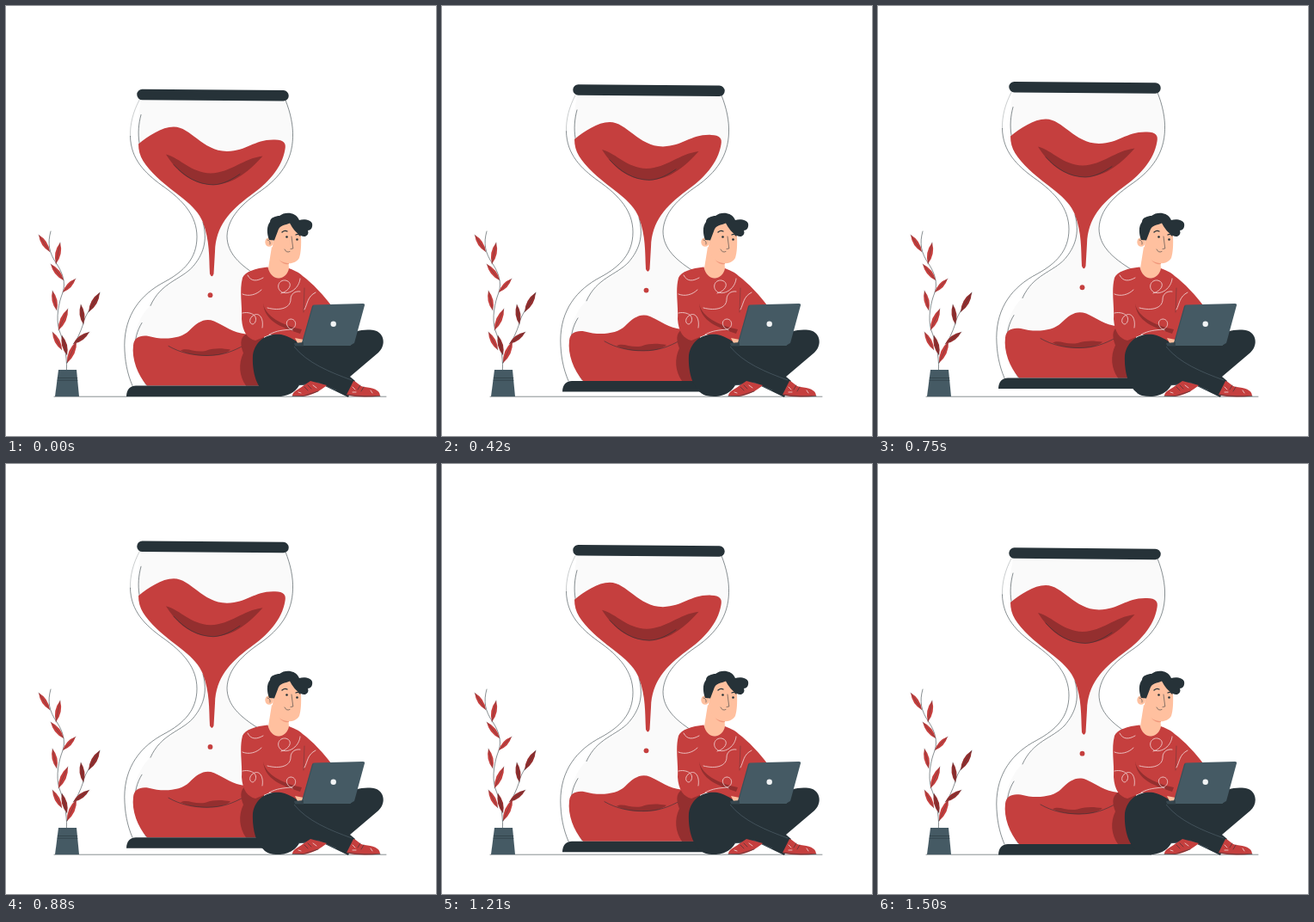
Write an HTML page that moves like this. It is 500 by 500 pixels and loops after 1540 ms.

```html
<!DOCTYPE html>
<html lang="en">
<head>
<meta charset="utf-8">
<title>Hourglass</title>
<style>
  html, body { margin: 0; height: 100%; overflow: hidden; background: #fff; }
  svg { display: block; width: 100vw; height: 100vh; }
  .dark { fill: #263238; }
  .red { fill: #c53f3e; }
  .deep { fill: #942f2f; }
  .slate { fill: #455a64; }
  .skin { fill: #ffc09f; }
  .line { fill: none; stroke: #263238; stroke-width: .55; stroke-linecap: round; stroke-linejoin: round; }
  .swirl { fill: none; stroke: #f3dcdc; stroke-width: .8; stroke-linecap: round; }
  .seam { fill: none; stroke: #55666f; stroke-width: .6; }
</style>
</head>
<body>
<svg viewBox="0 0 500 500">
  <path class="line" d="M56 454.200H442"/>

  <g id="plant">
    <path class="line" d="M70.500 423C71 405 67 390 61.500 376C58 362 61 346 66 333C70 321 65 309 59 300C50 287 48 276 52 262
      M71 415C73 400 83 391 90 369C92 360 96 355 109 334"/>
    <g id="leaves"></g>
    <path class="slate" d="M61 423H82L85 454H57Z"/>
    <path class="line" d="M60.300 432.500H82.900M60 435.200H83.100"/>
  </g>

  <g id="hourglass">
    <path fill="#fafafa" d="M157 110H325C331 125 334 140 333.500 153C333 181 318 200 297 215C275 230 258 246 257 268
      C257 288 272 302 295 316V442H163C152 428 147 412 148 396C150 375 156 360 168 349C183 318 231 318 231 270
      C231 238 205 227 182 205C162 187 153 171 153 149C153 135 155 121 157 110Z"/>
    <path class="line" stroke-opacity=".45" d="M155 110C148 123 144 138 144.500 152"/>
    <path class="line" d="M144.500 152C145 179 162 195 181 209C207 227 222 245 222 269C222 294 207 309 185 321
      C156 336 138 360 137.800 395C138 413 141 428 147 442
      M325 110C331 125 334 140 333.500 153C333 181 318 200 297 215C275 230 258 246 257 268C257 288 272 302 295 316
      M157 127C151 149 154 171 168 190M229 252C235 274 229 290 217 304C203 319 180 322 168 349
      M158 369C146 388 147 414 163 441"/>
    <path class="red" d="M154 161C165 152 181 141 195 141C215 141 228 169 257 169.500C281 169 289 155 313 156
      C323 156 326 160 324.500 167C321 189 304 207 284 221C260 239 244 256 243 286L241.500 312Q239.500 317.500 237 312
      C236 291 237 274 229 252C221 231 196 219 176 200C161 185 154 176 154 161Z"/>
    <path class="deep" d="M186 173C204 178 214 194 238 195C262 194 275 178 298.500 175C284 191 266 208 241 208.500C215 208 198 192 186 173Z"/>
    <path class="line" d="M195 185C208 199 222 208 241 208.500C253 208 263 202 272 196"/>
    <circle class="red" cx="237.500" cy="336.700" r="2.900"/>
    <path class="red" d="M148 395C149 386 156 383 166 384.500C182 389 203 388 213 378C223 368 231 363 242 367
      C255 373 263 380 279 382L298 390V442H164C153 429 146 411 148 395Z"/>
    <path class="deep" d="M203 401C211 397 219 404 232 401.500C244 397.500 252 399 261 400C257 405 243 407.500 232 407.200C221 407 211 405 203 401Z"/>
    <path class="line" d="M189 396C203 404 218 407 234 407C252 407 264 402 277 395"/>
    <path class="deep" d="M279 382C271 387 273 396 276 404C270 416 271 431 279 442H300V382Z"/>
    <path class="dark" d="M140 454.500C140 446 145 442 151 442H318V454.500Z"/>
    <path d="M158.500 103.600L322.500 104.900" stroke="#263238" stroke-width="12.500" stroke-linecap="round"/>
  </g>

  <g id="person">
    <path class="skin" d="M309 280L305 305C306 321 328 320 329 306L328 290Z"/>
    <path class="red" d="M304.500 303.500C290 305 278 309 275 316C271 331 275 348 274 364C275 379 281 387 290 389L307 382
      L345 392L359 348H378C370 337 356 322 345 314C340 309 334 307 329 305C326 320 308 321 304.500 303.500Z"/>
    <path class="deep" d="M299 346C302 361 320 371 344 376L342 381C318 373 301 366 299 346Z"/>
    <path class="line" stroke-opacity=".6" d="M347 328L346 356"/>
    <path class="swirl" d="M275 335C282 338 291 336 297 330M281 313C285 321 292 320 299 316
      M342 317C341 328 330 336 321 333C313 328 317 318 325 319C334 321 331 331 320 334
      M304 351C319 355 331 351 331 341C331 335 336 331 342 332
      M275 357C283 355 293 359 290 367C287 374 280 367 286 361C294 354 300 363 298 374
      M347 353C351 346 350 338 360 333M306 382C315 377 323 377 331 376C339 374 338 364 331 364C324 365 325 374 333 377"/>

    <path fill="#f0987c" d="M316 292C319 299 325 301 329 300V297Z"/>
    <path class="skin" d="M312 258L320 250H335L343 267C343.500 278 343 287 341 293C338 298 332 300 327 299C318 298 311 291 310 280Z"/>
    <ellipse class="skin" cx="306" cy="274.500" rx="4.700" ry="5.300"/>
    <path class="dark" d="M306 272C303 264 303 256 307 251C307 246 314 244 318 244C324 239 337 239 341 249
      C347 247 355 249 356 253C357 258 354 261 351 261C353 266 348 270 343 267C337 264 333 258 330 252.500
      C325 255 318 254 316 262L312 272.500Z"/>
    <g class="line">
      <path stroke-width="1.300" d="M321 263Q324 260.500 327 262M337 266Q340 264.500 342 267"/>
      <path d="M332 268L333.800 282L331 282.500M324 283Q326 287.500 330 285.500M304 272Q308 273 307 277"/>
    </g>
    <circle class="dark" cx="326.500" cy="268.500" r="1.300"/>
    <circle class="dark" cx="338.500" cy="271.500" r="1.300"/>

    <path class="dark" d="M287 406C290 387 306 380 320 382C330 384 338 390 346 395H400L406 379C415 376 424 376 431 378
      C441 383 441 396 433 403L400 431L406 436L398 455L367 440L341 441C334 453 320 456 307 453C291 447 286 425 287 406Z"/>
    <path class="seam" d="M335 396C350 415 377 426 402 435M340 441L363 438L384 447"/>
    <path class="skin" d="M336 386L346 388L345 392H339Z"/>
    <path class="slate" d="M358 347.500L415 346Q417.500 346 417 348L405 392L400 395H343L356 349Z"/>
    <path fill="#37474f" d="M335 392L346 391V395.500H336Z"/>
    <path class="line" stroke-opacity=".55" d="M357 348L344 394M335 395.500H400L405 392"/>
    <circle cx="380.700" cy="369.700" r="3.200" fill="#f2f4f5"/>

    <path class="red" d="M333 453.500C333 448 340 446 345 442L354 436L373 441C365 448 355 453 345 454Z"/>
    <path class="red" d="M396 452L404 436C409 437 410 442 417 443C426 444 435 446 435 453.500C421 455 406 455 396 452Z"/>
    <path class="line" d="M333 453.500L346 453.500L363 448M397 452C409 454 423 454 435 453.500M351 441L355 445M347 443L351 447M412 441L409 446M416 443L413 448"/>
    <path class="swirl" d="M340 449L343 450M357 441L361 444M403 443L406 446M403 449H407M424 447L426 450"/>
  </g>
</svg>
<script>
  const FPS = 24, LOOP = 1540, LIFT = 10, CYCLE = 36;

  // Each leaf: tip x, tip y, base x, base y, colour
  const RED = '#c53f3e', DEEP = '#942f2f';
  const leaves = [
    [38, 266, 51, 286, RED], [63, 275, 58, 300, RED], [52, 300, 67, 319, RED],
    [81, 317, 66, 333, RED], [54, 331, 59, 354, RED], [72, 352, 61, 377, RED],
    [54, 379, 65, 400, RED], [87, 347, 90, 370, DEEP], [109, 333, 96, 356, DEEP],
    [97, 379, 78, 393, DEEP], [65, 383, 71, 406, DEEP], [82, 390, 71, 415, RED]
  ];

  function leaf([x, y, bx, by, color]) {
    const dx = bx - x, dy = by - y;
    const bend = side => `${x + dx / 2 - side * dy * .25} ${y + dy / 2 + side * dx * .25}`;
    return `<path fill="${color}" d="M${x} ${y}Q${bend(1)} ${bx} ${by}Q${bend(-1)} ${x} ${y}"/>
      <path class="line" stroke-opacity=".6" d="M${x} ${y}L${bx} ${by}"/>`;
  }
  document.getElementById('leaves').innerHTML = leaves.map(leaf).join('');

  const hourglass = document.getElementById('hourglass');

  // Linear rise and fall over 1.5 s, stepped at 24 fps
  function draw() {
    const step = Math.floor((performance.now() % LOOP) * FPS / 1000 + .05) + 1;
    const lift = LIFT * Math.max(0, 1 - Math.abs(2 * step / CYCLE - 1));
    hourglass.setAttribute('transform', `translate(0 ${-lift})`);
    requestAnimationFrame(draw);
  }
  draw();
</script>
</body>
</html>
```
